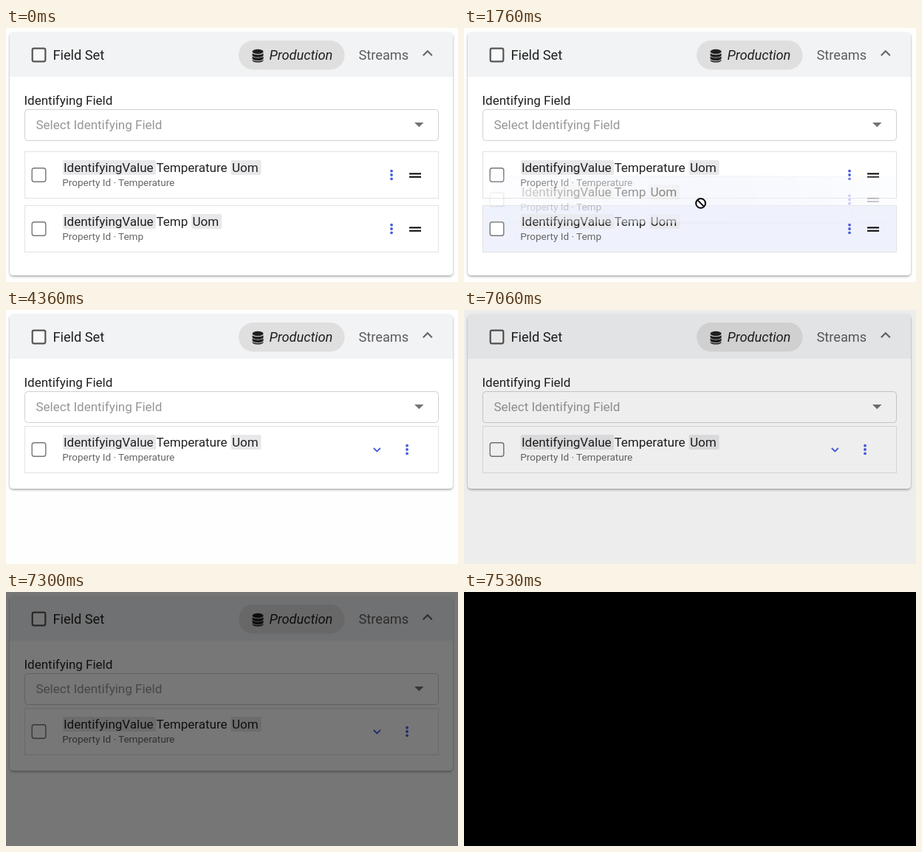
Animation of 612x344 px, one loop 8.03 s. Source, as an HTML page:

```html
<!DOCTYPE html>
<html lang="en">
<head>
<meta charset="utf-8">
<title>Field set</title>
<style>
html, body { margin: 0; width: 100%; height: 100%; overflow: hidden; background: #fefefe; }
svg { display: block; width: 100vw; height: 100vh; }
text { font-family: Roboto, sans-serif; font-size: 17px; fill: #1f1f1f; white-space: pre; }
.head { font-size: 18.2px; }
.sub { font-size: 13.5px; fill: #666; }
.chip { fill: #e8e8eb; }
.line { fill: none; stroke: #e2e2e4; }
.box { fill: #fff; stroke: #777; stroke-width: 1.4; }
.blue { fill: #4a5ce0; }
</style>
</head>
<body>
<svg id="stage" viewBox="0 0 612 344" xmlns="http://www.w3.org/2000/svg"></svg>
<script>
const LOOP = 8030;
const stage = document.getElementById('stage');
const clamp = v => Math.min(1, Math.max(0, v));
const part = (t, from, to) => clamp((t - from) / (to - from));

const rect = (x, y, w, h, attrs = '') =>
  `<rect x="${x}" y="${y}" width="${w}" height="${h}" ${attrs}/>`;
const label = (x, y, str, attrs = '') => `<text x="${x}" y="${y}" ${attrs}>${str}</text>`;
const dots = (x, y) =>
  [-5.3, 0, 5.3].map(d => `<circle class="blue" cx="${x}" cy="${y + d}" r="1.9"/>`).join('');

function row(y, name, uomX, tools, fill = 'none') {
  return `<g transform="translate(0 ${y})">
    ${rect(25.5, 0.5, 560, 63, `fill="${fill}"`)}
    ${rect(25.5, 0.5, 560, 63, 'class="line"')}
    ${rect(35.2, 22.7, 18.6, 18.6, 'rx="3" class="box"')}
    ${rect(77, 12, 126, 20, 'rx="2" class="chip"')}
    ${rect(uomX - 2, 12, 41, 20, 'rx="2" class="chip"')}
    ${label(78, 28, 'IdentifyingValue')}
    ${label(203.5, 28, name)}
    ${label(uomX - 0.5, 28, 'Uom')}
    ${label(76.3, 46.5, 'Property Id · ' + name, 'class="sub"')}
    ${tools}
  </g>`;
}

const grip = dots(522, 32) + rect(546, 29.4, 16, 2) + rect(546, 33.7, 16, 2);
const merged = dots(543, 32) +
  '<path d="M497.8 30l4.5 4.5 4.5-4.5" fill="none" stroke="#4a5ce0" stroke-width="1.8"/>';

const database = `<g fill="#1f1f1f">
  <ellipse cx="341" cy="32" rx="7.5" ry="3.2"/>
  <path id="disc" d="M333.5 34.2c2 2.6 13 2.6 15 0v3c-1 3.4-14 3.4-15 0z"/>
  <use href="#disc" y="4.4"/>
  <path d="M333.5 43c2 2.6 13 2.6 15 0v1c-1 3.4-14 3.4-15 0z"/>
</g>`;

const arrow = '<path d="M.5.5v12.2l2.9-2.7 2.1 4.7 2-.9-2.1-4.6h3.9z" fill="#fff" stroke="#000"/>';
const copyArrow = arrow +
  rect(2.5, 13.5, 8, 5, 'fill="none" stroke="#000" stroke-dasharray="2 1"') +
  rect(8.5, 16.5, 8, 8, 'fill="#fff" stroke="#000"') +
  '<path d="M10.5 20.5h4M12.5 18.5v4" stroke="#000"/>';
const noDrop = `<circle cx=".5" r="6.4" fill="#fff" stroke="#000" stroke-width="2"/>
  <path d="M-4 -4.5l9 9" stroke="#000" stroke-width="2"/>`;

stage.innerHTML = `
<defs>
  <filter id="shadow" x="-5%" y="-5%" width="110%" height="115%">
    <feDropShadow dx="0" dy="1.5" stdDeviation="1.6" flood-opacity=".36"/>
  </filter>
  <radialGradient id="glow" gradientUnits="userSpaceOnUse" cx="320" cy="277" r="330">
    <stop offset="0" stop-color="#fff" stop-opacity=".6"/>
    <stop offset=".5" stop-color="#fff" stop-opacity=".38"/>
    <stop offset="1" stop-color="#fff" stop-opacity="0"/>
  </radialGradient>
  <mask id="fade" maskUnits="userSpaceOnUse" x="0" y="230" width="612" height="90">
    ${rect(0, 230, 612, 90, 'fill="url(#glow)"')}
  </mask>
</defs>
${rect(0, 0, 612, 344, 'fill="#fefefe"')}
${rect(5, 6, 600, 329, 'id="card" rx="5" fill="#fff" filter="url(#shadow)"')}
<path d="M5 66V11q0-5 5-5h590q5 0 5 5v55z" fill="#f2f3f5"/>
${rect(35.7, 27.7, 17.6, 17.6, 'rx="2" fill="#fff" fill-opacity=".5" stroke="#555" stroke-width="2.2"')}
${label(63.5, 42.5, 'Field Set', 'class="head"')}
${rect(315, 17, 143.5, 39.5, 'rx="19.7" fill="#dfdfe0"')}
${database}
${label(356.5, 42.5, 'Production', 'class="head" font-style="italic"')}
${label(477.5, 42.5, 'Streams', 'class="head" style="fill:#5c5c5f"')}
<path d="M564.8 37.3l6-6 6 6" fill="none" stroke="#666" stroke-width="2.2"/>
${label(24.5, 104, 'Identifying Field')}
${rect(25.5, 110.5, 560, 42, 'rx="4" fill="#fff" stroke="#d0d0d2"')}
${label(40.5, 137, 'Select Identifying Field', 'style="fill:#969698"')}
<path d="M553 128h12.5l-6.2 6.3z" fill="#747474"/>
<g id="pair">
  ${row(167, 'Temperature', 306.5, grip)}
  <g id="plain">${row(240, 'Temp', 253, grip)}</g>
  <g id="hover">${row(240, 'Temp', 253, grip, '#eff2fc')}</g>
</g>
<g id="single">${row(157, 'Temperature', 306.5, merged)}</g>
<g id="ghost"><g mask="url(#fade)">${row(240, 'Temp', 253, grip, '#eff2fc')}</g></g>
<g id="cursor">
  <g id="arrow">${arrow}</g>
  <g id="copy">${copyArrow}</g>
  <g id="noDrop">${noDrop}</g>
</g>
${rect(0, 0, 612, 344, 'id="black"')}`;

const el = {};
stage.querySelectorAll('[id]').forEach(node => el[node.id] = node);
const show = (id, on) => el[id].setAttribute('display', on ? 'inline' : 'none');
const move = (id, x, y) => el[id].setAttribute('transform', `translate(${x} ${y})`);

const ENTER = 460, GRAB = 1330, DROP = 2760, LEAVE = 4200, FADE = 7060;
const GRAB_Y = 277, DROP_Y = 206;

function draw(t) {
  const dropped = t >= DROP;
  const dragging = t >= GRAB && !dropped;

  const rest = (1 - part(t, ENTER, 830)) ** 2;
  const u = part(t, GRAB, 2130);
  const y = GRAB_Y + 65 * rest - (GRAB_Y - DROP_Y) * u * u * (3 - 2 * u);
  move('cursor', 320 + 8 * rest, y);
  move('ghost', 0, y - GRAB_Y);

  const between = dragging && y > 231 && y < 240;
  show('arrow', t < GRAB);
  show('copy', t >= GRAB && !between);
  show('noDrop', between);

  const hover = t >= ENTER && y < 303;
  show('pair', !dropped);
  show('single', dropped);
  show('plain', !hover);
  show('hover', hover);
  show('ghost', dragging);
  el.card.setAttribute('height', dropped ? 236 : 329);

  const gone = t < LEAVE ? 0 : clamp((Math.floor((t - LEAVE) / 40) + 1) / 5);
  show('cursor', t >= ENTER && gone < 1);
  el.cursor.setAttribute('opacity', 1 - gone);

  const dark = t < FADE ? 0 : clamp((Math.floor((t - FADE) / 33.5) + 1) / 15);
  el.black.setAttribute('opacity', dark);
}

const start = performance.now();
function tick() {
  draw((performance.now() - start) % LOOP);
  requestAnimationFrame(tick);
}
tick();
</script>
</body>
</html>
```
